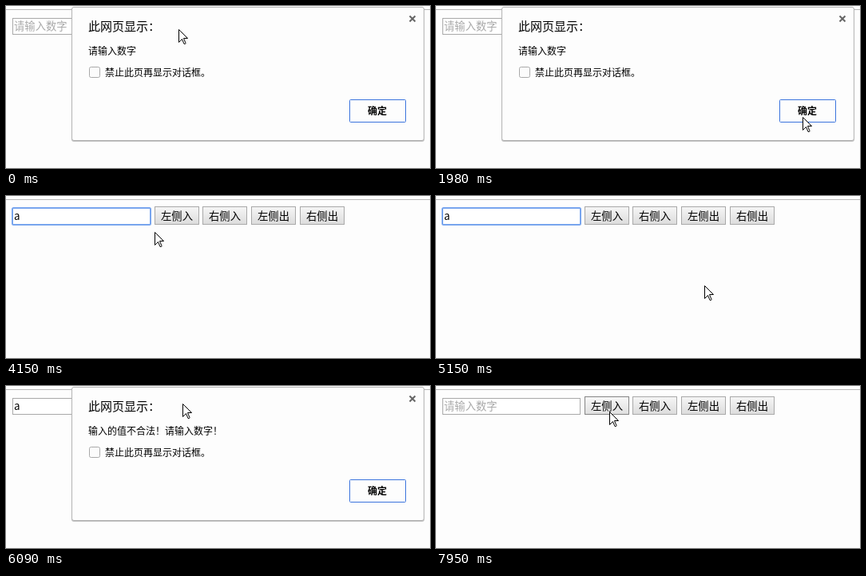
An HTML page that plays this animation: 531 px wide and 203 px high, repeating every 8000 ms.

```html
<!DOCTYPE html>
<html lang="zh-CN">
<head>
<meta charset="utf-8">
<style>
  html, body { margin: 0; width: 100%; height: 100%; overflow: hidden; background: #fdfdfd; }
  svg { display: block; width: 531px; height: 203px; }
  text { font: 13.33px "Noto Sans CJK SC", "Noto Sans CJK", sans-serif; fill: #000; }
  .centred { font-family: "Noto Sans CJK JP", "Noto Sans CJK", sans-serif; }
  .button rect { fill: url(#face); stroke: #a9a9a9; }
  .button.hover rect { fill: url(#hoverFace); stroke: #858585; }
  .button.pressed rect { fill: url(#pressedFace); stroke: #858585; }
  .dialog text { font-size: 12px; }
  .dialog .title { font-size: 15px; }
  .dialog .ok { font-weight: bold; }
</style>
</head>
<body>
<svg viewBox="0 0 531 203">
  <defs>
    <linearGradient id="face" x2="0" y2="1"><stop stop-color="#f6f6f6"/><stop offset="1" stop-color="#dcdcdc"/></linearGradient>
    <linearGradient id="hoverFace" x2="0" y2="1"><stop stop-color="#f8f8f8"/><stop offset="1" stop-color="#dfdfdf"/></linearGradient>
    <linearGradient id="pressedFace" x2="0" y2="1"><stop stop-color="#e4e4e4"/><stop offset="1" stop-color="#ededed"/></linearGradient>
  </defs>
  <rect width="531" height="203" fill="#fdfdfd"/>
  <rect y="4" width="531" height="1" fill="#b6b6b6"/>

  <rect x="8.5" y="15.5" width="172" height="20" fill="#fff" stroke="#a9a9a9"/>
  <rect id="focusRing" x="8" y="15" width="173" height="21" rx="1.5" fill="#fff" stroke="#78a5ee" stroke-width="2"/>
  <text id="field" x="10" y="30"></text>
  <rect id="caret" y="18" width="1" height="16"/>
  <g id="buttons"></g>

  <g id="dialog" class="dialog">
    <rect x="82" y="2" width="442" height="168" rx="3" opacity=".25"/>
    <rect x="82.5" y="1.5" width="441" height="167" rx="2.5" fill="#fdfdfd" stroke="#b4b4b4"/>
    <path d="M505.5 12.5l7 7m0-7l-7 7" stroke="#666" stroke-width="2"/>
    <text class="title" x="103" y="31">此网页显示<tspan class="centred">：</tspan></text>
    <text id="message" x="103" y="61"></text>
    <rect x="104.5" y="76.5" width="13" height="13" rx="2" fill="#fbfbfb" stroke="#a9a9a9"/>
    <text x="124" y="88">禁止此页再显示对话框。</text>
    <rect id="ok" x="430.5" y="117.5" width="70" height="28" rx="1" stroke="#3b74dd"/>
    <text class="ok" x="453" y="136">确定</text>
  </g>

  <path id="arrow" d="M.5 .5V16.5L4.5 12.5 7 18.5H8.5L9 17.5 6.5 11.5H11.5Z" fill="#fff" stroke="#000" stroke-linejoin="round"/>
  <path id="beam" d="M-2.5 -7.5H-.5L.5 -6.5 1.5 -7.5H3.5M.5 -6.5V6.5M-2.5 7.5H-.5L.5 6.5 1.5 7.5H3.5" fill="none" stroke="#000"/>
</svg>
<script>
const LOOP = 8000;
const STEP = 120;
const FOCUS = 3070, TYPE = 3650, SUBMIT = 5700, CLEAR = 7430;

const $ = id => document.getElementById(id);
const set = (el, attrs) => Object.entries(attrs).forEach(([k, v]) => el.setAttribute(k, v));
const show = (el, visible) => set(el, { visibility: visible ? 'visible' : 'hidden' });
const between = (t, from, to) => t >= from && t < to;

// Eased 0..1 in discrete steps; the first step is taken at the start time.
function progress(t, start, steps) {
  const p = Math.min(Math.max(Math.floor((t - start) / STEP) + 1, 0) / steps, 1);
  return p * p * (3 - 2 * p);
}

// Pointer moves: start time, number of steps, destination
const moves = [
  [550, 2, 238, 29], [830, 8, 459, 139],
  [2500, 2, 146, 37], [2780, 2, 134, 29],
  [4030, 2, 186, 45], [4270, 3, 218, 45],
  [4660, 3, 438, 183], [5030, 4, 234, 40], [5550, 1, 221, 22],
  [6340, 4, 449, 108], [6880, 1, 455, 118], [7000, 1, 459, 129],
  [7550, 1, 305, 60], [7700, 3, 217, 32]
];

function pointerAt(t) {
  return moves.reduce(([x, y], [start, steps, toX, toY]) => {
    const p = progress(t, start, steps);
    return [Math.round(x + (toX - x) * p), Math.round(y + (toY - y) * p)];
  }, [216, 29]);
}

const buttons = ['左侧入', '右侧入', '左侧出', '右侧出'].map((label, i) => {
  const x = 186 + Math.floor(i * 60.7);
  $('buttons').insertAdjacentHTML('beforeend',
    `<g class="button"><rect x="${x + .5}" y="13.5" width="55" height="22"/><text x="${x + 8}" y="30">${label}</text></g>`);
  return { x, el: $('buttons').lastChild };
});

function drawButtons(t, x, y) {
  buttons.forEach((button, i) => {
    const hover = between(x, button.x, button.x + 56) && between(y, 13, 36);
    const pressed = i === 0 && between(t, SUBMIT, SUBMIT + STEP);
    set(button.el, { class: `button${hover ? ' hover' : ''}${pressed ? ' pressed' : ''}` });
  });
}

function drawField(t) {
  const typed = between(t, TYPE, CLEAR);
  const focused = between(t, FOCUS, SUBMIT);
  $('field').textContent = typed ? 'a' : '请输入数字';
  $('field').style.fill = typed ? '#000' : '#a9a9a9';
  show($('focusRing'), focused);
  show($('caret'), focused && (t - (typed ? TYPE : FOCUS)) % 1000 < 500);
  set($('caret'), { x: typed ? 17 : 10 });
}

function drawDialog(t) {
  const opacity = 1 - progress(t, 2380, 2) + progress(t, 5850, 3) - progress(t, CLEAR, 2);
  const scale = .947 + .053 * opacity;
  const pressed = between(t, 2260, 2500) || between(t, 7280, 7550);
  set($('dialog'), { opacity, transform: `translate(303 85) scale(${scale}) translate(-303 -85)` });
  set($('ok'), { fill: pressed ? '#ececec' : '#fdfdfd' });
  const message = t < SUBMIT ? '请输入数字' : '输入的值不合法！请输入数字！';
  $('message').innerHTML = message.replaceAll('！', '<tspan class="centred">！</tspan>');
}

function drawPointer(t, x, y) {
  const overText = between(t, 2780, 4030);
  show($('arrow'), !overText);
  show($('beam'), overText);
  set($(overText ? 'beam' : 'arrow'), { transform: `translate(${x} ${y})` });
}

function draw(t) {
  const [x, y] = pointerAt(t);
  drawButtons(t, x, y);
  drawField(t);
  drawDialog(t);
  drawPointer(t, x, y);
}

const start = performance.now();
function tick() {
  draw((performance.now() - start) % LOOP);
  requestAnimationFrame(tick);
}
tick();
</script>
</body>
</html>
```
